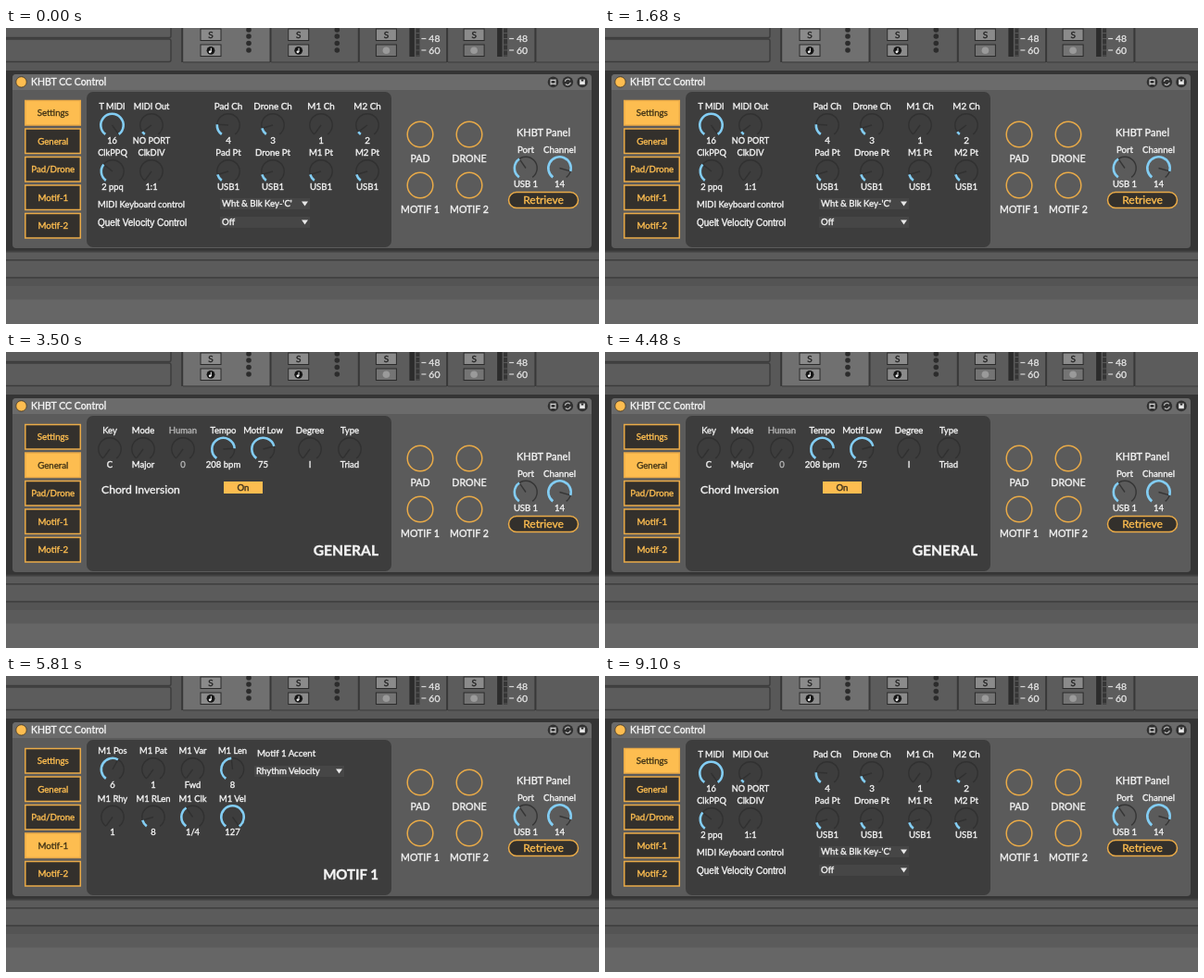
Write an HTML page that moves like this. It is 640 by 320 pixels and loops after 9170 ms.

```html
<!DOCTYPE html>
<html lang="en">
<head>
<meta charset="utf-8">
<title>CC Control</title>
<style>
  html, body { margin: 0; width: 100%; height: 100%; overflow: hidden; background: #5b5b5b; }
  svg { display: block; width: 640px; height: 320px; }
  text { font-family: Lato, "Open Sans", sans-serif; stroke-width: .36px; }
</style>
</head>
<body>
<svg id="stage" viewBox="0 0 640 320" xmlns="http://www.w3.org/2000/svg"></svg>
<script>
const LOOP = 9170;
const ORANGE = '#eaab48', AMBER = '#fdbd50', BLUE = '#83cdf3', WHITE = '#f4f4f4', DARK = '#33302c';
const NAMES = ['Settings', 'General', 'Pad/Drone', 'Motif-1', 'Motif-2'];
// [start in ms, page]
const STEPS = [[0, 0], [3150, 1], [4760, 2], [5670, 3], [6790, 4], [7910, 0]];

const rect = (x, y, w, h, fill, extra = '') =>
  `<rect x="${x}" y="${y}" width="${w}" height="${h}" fill="${fill}" ${extra}/>`;
const circle = (x, y, r, fill, extra = '') =>
  `<circle cx="${x}" cy="${y}" r="${r}" fill="${fill}" ${extra}/>`;
const path = (d, color, width = 1, fill = 'none') =>
  `<path d="${d}" fill="${fill}" stroke="${color}" stroke-width="${width}"/>`;
const text = (s, x, y, size = 9.6, color = WHITE, anchor = 'middle', extra = '') =>
  `<text x="${x}" y="${y}" font-size="${size}" fill="${color}" stroke="${color}" text-anchor="${anchor}" ${extra}>${s.replace('&', '&amp;')}</text>`;
const left = (s, x, y, size, color, extra) => text(s, x, y, size, color, 'start', extra);
const outline = (color, width) => `stroke="${color}" stroke-width="${width}"`;

// Point on a dial: v runs 0..1 over 288 degrees, from lower left to lower right
function polar(x, y, r, v) {
  const a = (126 + 288 * v) * Math.PI / 180;
  return (x + r * Math.cos(a)).toFixed(2) + ' ' + (y + r * Math.sin(a)).toFixed(2);
}
function arc(x, y, r, v) {
  return `M${polar(x, y, r, 0)}A${r} ${r} 0 ${v > .625 ? 1 : 0} 1 ${polar(x, y, r, v)}`;
}
function dial(x, y, v, track = '#313131') {
  return path(arc(x, y, 12.2, 1), track, 1.4) +
    path(`M${x} ${y}L${polar(x, y, 11.5, v)}`, track, 1.4) +
    (v ? path(arc(x, y, 12.2, v), BLUE, 2.6) : '');
}
// items: [x, label, value, dial position]
function dials(items, y, labelY, valueY, size = 9.5) {
  return items.map(([x, label, value, v]) => {
    const color = label === 'Human' ? '#b5b5b5' : WHITE;
    return dial(x, y, v) + text(label, x, labelY, size, color) + text(value, x, valueY, size, color);
  }).join('');
}
function menu(label, x, y) {
  return rect(x, y, 97, 12, '#464646') + left(label, x + 2, y + 9.4, 9.6) +
    `<path d="M${x + 88} ${y + 3.6}h7l-3.5 5z" fill="#e8e8e8"/>`;
}
const title = s => text(s, 402, 220, s.startsWith('MOTIF') ? 15 : 15.6, WHITE, 'end', 'font-weight="700"');

function settings() {
  const xs = [240, 288, 340, 390], parts = ['Pad', 'Drone', 'M1', 'M2'];
  const channels = [['4', .2], ['3', .13], ['1', 0], ['2', .06]];
  return dials([[114.5, 'T MIDI', '16', 1], [157, 'MIDI Out', 'NO PORT', .06]], 105, 88, 125, 9.2) +
    dials(xs.map((x, i) => [x, parts[i] + ' Ch', ...channels[i]]), 105, 88, 125, 9.8) +
    dials([[115, 'ClkPPQ', '2 ppq', .32], [157, 'ClkDIV', '1:1', 0]], 155, 138.4, 175, 9.3) +
    dials(xs.map((x, i) => [x, parts[i] + ' Pt', 'USB1', .13]), 155, 138.4, 175, 9.6) +
    left('MIDI Keyboard control', 99, 193.8, 9.4) +
    left('Quelt Velocity Control', 99, 213.8, 10, WHITE, `style="font-family:'Liberation Sans',Arial,sans-serif"`) +
    menu("Wht & Blk Key-'C'", 231, 184) + menu('Off', 231, 204);
}
function general() {
  return dials([
    [112, 'Key', 'C', 0], [148, 'Mode', 'Major', 0], [191, 'Human', '0', 0],
    [234.5, 'Tempo', '208 bpm', .8], [277.5, 'Motif Low', '75', .76],
    [328, 'Degree', 'I', 0], [371, 'Type', 'Triad', 0]
  ], 105, 88, 125) +
    left('Chord Inversion', 103, 153, 12.2) +
    rect(235, 140, 42, 13, AMBER) + text('On', 256, 150, 9.6, '#3a301d') + title('GENERAL');
}
function grid(rows) {
  const xs = [115, 159, 201.5, 244.5];
  return rows.map((row, i) =>
    dials(row.map((item, k) => [xs[k], ...item]), 101 + 51.5 * i, 84 + 52 * i, 121.4 + 51 * i, 9.4)).join('');
}
function padDrone() {
  return grid([
    [['Pad Pos', '6', .5], ['Strum', '1', 0], ['Range', '8', .35], ['Pad Vel', '127', 1]],
    [['Dr Pos', '1', 0], ['Dr Type', '1', 0], ['Dr Trig', '1', 0], ['Dr Vel', '127', 1]]
  ]) + title('PAD/DRONE');
}
function motif(n, pat, variation, rhythm) {
  const m = 'M' + n + ' ';
  return grid([
    [[m + 'Pos', '6', .6], [m + 'Pat', ...pat], [m + 'Var', ...variation], [m + 'Len', '8', .48]],
    [[m + 'Rhy', ...rhythm], [m + 'RLen', '8', .13], [m + 'Clk', '1/4', .38], [m + 'Vel', '127', 1]]
  ]) + left(`Motif ${n} Accent`, 271, 87, 9.7) + menu('Rhythm Velocity', 268, 97) + title('MOTIF ' + n);
}

function mixer() {
  const edge = outline('#3c3c3c', 1.4);
  let s = rect(0, 0, 640, 46, '#585858') +
    rect(-4, -4, 182, 14.5, '#5c5c5c', `rx="2" ${edge}`) + rect(-4, 12, 182, 24.5, '#5c5c5c', `rx="2" ${edge}`);
  for (let i = 0; i < 5; i++) {
    const x = 191 + 95.3 * i, box = 210 + 94.7 * i;
    s += rect(x, -2, 94, 38.5, i ? '#5c5c5c' : '#707070') +
      path(`M${x - .8} 0V37`, '#383838', 2) + path(`M${x} 37h94`, '#3c3c3c', 1.2);
    if (i > 3) continue;
    s += rect(box, 1, 22, 12.5, '#8b8b8b', outline('#2b2b2b', 1)) + text('S', box + 11, 11, 10, '#222') +
      rect(box, 18, 22, 12.5, i < 2 ? '#8b8b8b' : '#747474', outline('#2b2b2b', 1));
    if (i < 2) {
      s += circle(box + 11, 24.3, 4.4, '#151515') +
        circle(box + 10.2, 25.8, 1.4, '#eee') + path(`M${box + 11.3} 26V21.6`, '#eee', 1);
      for (const y of [2, 9, 16.5, 24]) s += circle(x + 71, y, 2.8, '#2c2c2c');
    } else {
      const mx = box + 36;
      s += circle(box + 11, 24.3, 3.8, '#9a9a9a') +
        rect(mx, -1, 5.5, 32, '#2c2c2c') + rect(mx + 7, -1, 4, 32, '#353535');
      for (const y of [0, 5.5, 11.5, 18, 24, 30]) s += path(`M${mx + 7} ${y}h4`, '#585858', 1);
      for (const y of [11.5, 24]) s += path(`M${mx + 13} ${y}h5`, '#d5d5d5', 1.2);
      s += text('48', mx + 27, 15, 10.4, '#e2e2e2') + text('60', mx + 27, 28, 10.4, '#e2e2e2');
    }
  }
  return s;
}
function footer() {
  return rect(0, 242, 640, 78, '#5b5b5b') + rect(0, 270, 640, 9, '#545454') +
    rect(0, 293.5, 640, 27, '#666') +
    [241.5, 250.8, 269.8].map(y => path(`M0 ${y}H640`, '#414141', 1.8)).join('');
}
function device() {
  let s = rect(0, 46, 640, 196, '#353535') +
    rect(7, 50, 625, 188, '#5b5b5b', 'rx="4"') +
    '<path d="M7 67V54q0-4 4-4h617q4 0 4 4V67z" fill="#6b6b6b"/>' +
    circle(16.5, 58.4, 5.7, AMBER, outline('#3c3221', .8)) +
    left('KHBT CC Control', 27, 62, 10.5);
  for (const x of [590.5, 606.3, 622]) s += circle(x, 58.4, 5.8, '#303030');
  s += path('M588 55.4v6M593 55.4v6M588 56.4h5M588 60.4h5', '#d5d5d5', 1.1) +
    path('M603.3 57.9a3.1 3.1 0 0 1 5.4-1.6M609.3 58.9a3.1 3.1 0 0 1-5.4 1.6', '#b5b5b5', 1.2) +
    rect(619.2, 55.6, 5.6, 5.6, '#e8e8e8') + rect(620.7, 55.6, 2.6, 2, '#303030') +
    rect(87, 69, 329, 168, '#3d3d3d', 'rx="7"');

  [['PAD', 447, 115], ['DRONE', 500, 115], ['MOTIF 1', 447, 170], ['MOTIF 2', 500, 170]]
    .forEach(([label, x, y]) => {
      s += circle(x, y, 13.8, '#5b5b5b', outline(ORANGE, 1.5)) + text(label, x, y + 30, 10.6);
    });
  s += text('KHBT Panel', 580, 117, 11) +
    [[561, 'Port', 'USB 1', .38], [597.5, 'Channel', '14', .867]].map(([x, label, value, v]) =>
      dial(x, 151.5, v, '#353535') + text(label, x, 135.2, 9.7) + text(value, x, 172, 9.5)).join('') +
    rect(542.5, 177.5, 75, 17, DARK, `rx="8.5" ${outline(ORANGE, 1.5)}`) +
    text('Retrieve', 580, 190, 12, AMBER);
  return s;
}
function tabs(active) {
  return NAMES.map((name, i) => {
    const y = 78.5 + 30.5 * i, on = i === active;
    return rect(20.8, y, 59.5, 26.5, on ? AMBER : DARK, outline(ORANGE, 1.5)) +
      text(name, 50.8, y + 16.6, 9.7, on ? '#433517' : AMBER);
  }).join('');
}

const pages = [
  settings(), general(), padDrone(),
  motif(1, ['1', 0], ['Fwd', 0], ['1', 0]),
  motif(2, ['2', .02], ['Rev', .2], ['14', .34])
];
const stage = document.getElementById('stage');
stage.innerHTML = mixer() + device() + footer() +
  pages.map((page, i) => `<g class="page" display="none">${tabs(i)}${page}</g>`).join('');
const groups = [...stage.querySelectorAll('.page')];

let shown = -1;
const begin = performance.now();
function draw(now) {
  const t = Math.max(0, now - begin) % LOOP;
  const page = STEPS.filter(([start]) => start <= t).pop()[1];
  if (page !== shown) {
    groups.forEach((g, i) => g.setAttribute('display', i === page ? 'inline' : 'none'));
    shown = page;
  }
  requestAnimationFrame(draw);
}
draw(begin);
</script>
</body>
</html>
```
